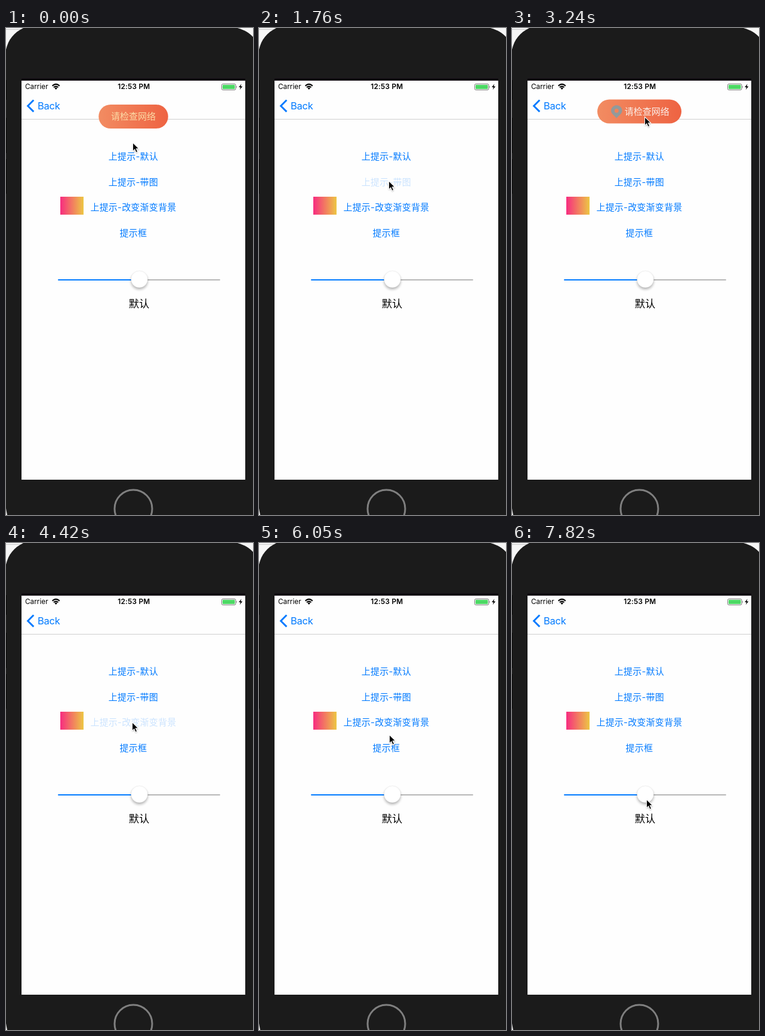
These frames come from a looping animation (414 px wide and 814 px high, 8000 ms). An HTML page:

```html
<!DOCTYPE html>
<html lang="zh-CN">
<head>
<meta charset="utf-8">
<title>Toast demo</title>
<style>
  html, body { margin: 0; width: 100%; height: 100%; overflow: hidden; background: #f6f6f6; }
  svg { display: block; }
  text { font-family: Inter, "Noto Sans CJK SC", "Noto Sans CJK", sans-serif; font-size: 15px; }
  .mid { text-anchor: middle; }
  .link { fill: #007aff; }
  #links text { letter-spacing: .2px; }
</style>
</head>
<body>
<svg width="414" height="814" viewBox="0 0 414 814">
  <defs>
    <linearGradient id="orange"><stop stop-color="#f28c62"/><stop offset="1" stop-color="#ee6342"/></linearGradient>
    <linearGradient id="candy"><stop stop-color="#f72c80"/><stop offset="1" stop-color="#edc744"/></linearGradient>
    <clipPath id="screen"><rect x="26" y="88" width="375" height="667"/></clipPath>
    <filter id="soft" x="-50%" y="-50%" width="200%" height="200%"><feGaussianBlur stdDeviation="2"/></filter>
    <filter id="shade" x="-50%" y="-50%" width="200%" height="200%"><feGaussianBlur stdDeviation=".8"/></filter>
  </defs>

  <!-- device -->
  <path d="M0 2.5H28" stroke="#c9c9c9"/>
  <path d="M0 36C4 19 13 8 29 0H388C399 3 408 8 414 15V814H2Q1 809 0 803Z" fill="#1b1b1b"/>
  <path d="M.5 87V120M.5 150V209M.5 219V277" stroke="#050505"/>
  <rect x="26" y="84" width="375" height="4" fill="#110a12"/>
  <circle cx="213.5" cy="803.5" r="31.5" fill="none" stroke="#7f7f7f" stroke-width="3"/>
  <rect x="26" y="88" width="375" height="667" fill="#fefefe"/>

  <!-- navigation -->
  <path d="M26 152.5H401" stroke="#cfcfcf"/>
  <path d="M46.3 120.5L36.6 130.2L46.3 139.9" fill="none" stroke="#007aff" stroke-width="2.9"/>
  <text x="53" y="136" class="link" style="font-size:16.5px;letter-spacing:-.25px">Back</text>

  <!-- page -->
  <g id="links"></g>
  <rect x="91" y="282" width="39" height="30" fill="url(#candy)"/>
  <path d="M88 421H223" stroke="#007aff" stroke-width="2" stroke-linecap="round"/>
  <path d="M223 421H358" stroke="#b7b7b7" stroke-width="2" stroke-linecap="round"/>
  <circle cx="223.5" cy="423" r="14" fill="#000" opacity=".28" filter="url(#soft)"/>
  <circle cx="223.5" cy="420" r="14" fill="#fff" stroke="#000" stroke-opacity=".1" stroke-width=".6"/>
  <text x="223" y="467" class="mid" style="font-size:17.3px">默认</text>

  <g id="box">
    <rect x="141" y="396" width="145" height="55" rx="8" fill="#000" opacity=".75"/>
    <text x="213.5" y="429" class="mid" fill="#fff">请检查网络</text>
  </g>
  <g id="toasts" clip-path="url(#screen)"></g>

  <!-- status bar -->
  <text x="32" y="102.3" style="font-size:11.8px">Carrier</text>
  <g fill="none" stroke="#000" stroke-width="2.1">
    <path d="M77.6 96.8Q83.7 90.8 89.8 96.8M80 99.3Q83.7 95.8 87.4 99.3"/>
    <path d="M81.4 100.4Q83.7 98.4 86 100.4L83.7 103Z" fill="#000" stroke="none"/>
  </g>
  <text x="214.3" y="102.3" class="mid" style="font-size:11.8px;font-weight:600;letter-spacing:.25px">12:53 PM</text>
  <rect x="361.5" y="93.5" width="23.5" height="10" rx="2" fill="none" stroke="#666" stroke-width=".9"/>
  <rect x="363" y="95" width="20.5" height="7" rx=".8" fill="#4cd964"/>
  <path d="M386.2 96.8Q388 98.5 386.2 100.2Z" fill="#555"/>
  <path d="M394.6 93.3L390.2 99H393L391.8 103.2L396.4 97.4H393.4Z"/>

  <g id="cursor">
    <path d="M0 1.5V16L3.4 13L5.7 18L8.4 16.9L6.2 12H11Z" fill="#000" opacity=".35" filter="url(#shade)"/>
    <path d="M0 0V14.4L3.3 11.4L5.6 16.7L8.2 15.6L5.9 10.4H10.4Z" stroke="#fff" stroke-width="1.1"/>
  </g>
</svg>
<script>
// All times below are in ticks; the picture holds still between ticks.
const LOOP = 8000, TICKS = 54, REST = 128;
const $ = id => document.getElementById(id);
const clamp = v => Math.max(0, Math.min(1, v));
const easeOut = p => 1 - (1 - clamp(p)) ** 2.5;

const links = [
  { label: '上提示-默认', y: 219.8 },
  { label: '上提示-带图', y: 262.7, press: 12 },
  { label: '上提示-改变渐变背景', y: 304.8, press: 30 },
  { label: '提示框', y: 347.7, press: 46 },
];

const toasts = [
  { fill: 'orange', ink: '#fbdba6', enter: -9, leave: 5 },
  { fill: 'orange', ink: '#fbefe9', enter: 13, leave: 22, icon: true },
  { fill: 'candy', ink: '#fff', enter: 31, leave: 38, icon: true },
];

// Cursor legs: start tick, end tick, goal
const home = [213, 192];
const legs = [
  [0, 3, 213, 158],
  [4, 10, 218, 256],
  [16, 20, 223, 149],
  [22, 29, 212, 300],
  [33, 37, 219, 150],
  [37, 44, 219, 344],
  [46, 49, 226, 429],
];

const pin = `<path fill="#929a9b" fill-rule="evenodd"
  d="M175.3 31.3C172 27 166 23.5 166 18.6A9.3 9.1 0 0 1 184.6 18.6C184.6 23.5 178.6 27 175.3 31.3Z
     M175.3 15.1A3.5 3.5 0 1 0 175.3 22.1A3.5 3.5 0 1 0 175.3 15.1Z"/>`;

$('links').innerHTML = links.map(({ label, y }) =>
  `<text class="mid link" x="213.4" y="${y}">${label}</text>`).join('');

$('toasts').innerHTML = toasts.map(({ fill, ink, icon }) => {
  const width = icon ? 141 : 116.5;
  return `<g><rect x="${213.5 - width / 2}" width="${width}" height="40" rx="20" fill="url(#${fill})"/>
    ${icon ? pin : ''}<text class="mid" x="${icon ? 226.3 : 213.5}" y="25.5" fill="${ink}">请检查网络</text></g>`;
}).join('');

// Springs down to rest, later accelerates back up
function toastTop({ enter, leave }, k) {
  if (k < enter) return -60;
  const drop = 66 * 0.3 ** (k - enter);
  const lift = 164 * (Math.max(0, k - leave + 1) / 3) ** 2.7;
  return Math.max(-60, REST - drop - lift);
}

// A pressed link dims at once, then recovers
const linkOpacity = ({ press }, k) => k >= press ? clamp(0.2 + 0.27 * (k - press)) : 1;

const cursorAt = k => legs.reduce(([x, y], [from, to, gx, gy]) => {
  const p = easeOut((k - from) / (to - from));
  return [x + (gx - x) * p, y + (gy - y) * p];
}, home);

function draw(k) {
  toasts.forEach((toast, i) =>
    $('toasts').children[i].setAttribute('transform', `translate(0 ${toastTop(toast, k)})`));
  links.forEach((link, i) =>
    $('links').children[i].setAttribute('opacity', linkOpacity(link, k)));
  $('box').setAttribute('opacity', clamp(Math.min(k - 46, 53 - k) / 2));
  const [x, y] = cursorAt(k);
  $('cursor').setAttribute('transform', `translate(${Math.round(x) - 0.5} ${Math.round(y) - 0.5})`);
}

const start = performance.now();
function tick() {
  const t = (performance.now() - start) % LOOP;
  draw(Math.min(TICKS - 1, Math.floor(t / LOOP * TICKS + 0.25)));
  requestAnimationFrame(tick);
}
tick();
</script>
</body>
</html>
```
